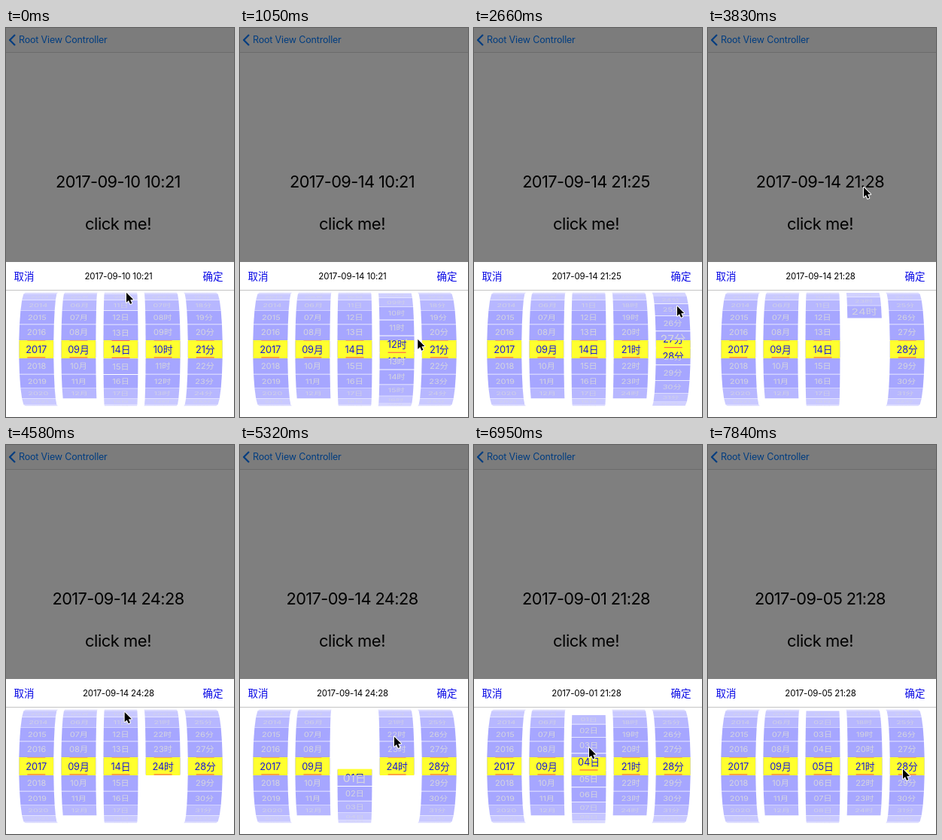
Animation of 303x517 px, one loop 7.99 s. Source, as an HTML page with a canvas:

```html
<!DOCTYPE html>
<html lang="zh">
<head>
<meta charset="utf-8">
<title>Date picker</title>
<style>
html, body { margin: 0; width: 100%; height: 100%; overflow: hidden; background: #fff; }
canvas { display: block; width: 303px; height: 517px; }
</style>
</head>
<body>
<canvas id="stage"></canvas>
<script>
const W = 303, H = 517, LOOP = 7990, STEP = 148;
const FONT = 'Inter, "Noto Sans CJK SC", "Noto Sans CJK", sans-serif';
const canvas = document.getElementById('stage');
const ctx = canvas.getContext('2d');
const dpr = window.devicePixelRatio || 1;
canvas.width = W * dpr;
canvas.height = H * dpr;

// Wheel geometry: a 22-sided drum seen in perspective
const CX = 152.5, CY = 427, RADIUS = 79.5, DEPTH = 1200;
const ANGLE = Math.PI * 2 / 22;
const HALF_W = 23, HALF_H = RADIUS * Math.tan(ANGLE / 2);
const ROW = 23, BAND_TOP = 415, BAND_H = 24;

const clamp = (v, lo, hi) => Math.max(lo, Math.min(hi, v));
const lerp = (a, b, u) => a + (b - a) * u;
const smooth = u => u * u * (3 - 2 * u);
const glide = u => 1 - (1 - u) ** 2;
const pad = n => String(n).padStart(2, '0');

const year = { unit: '', min: 1990, max: 2050, initial: 2017 };
const month = { unit: '月', min: 1, max: 12, initial: 9 };
const day = { unit: '日', min: 1, max: 30, initial: 10 };
const hour = { unit: '时', min: 1, max: 24, initial: 10 };
const minute = { unit: '分', min: 0, max: 59, initial: 21 };
const columns = [year, month, day, hour, minute];

// Scroll gestures in order of start; values beyond a limit bounce back
const scrolls = [
  { col: day, start: -1500, end: 100, to: 14, ease: glide },
  { col: hour, start: 890, end: 2215, to: 21, ease: glide },
  { col: minute, start: 1200, end: 2000, to: 25, ease: glide },
  { col: minute, start: 2370, end: 2840, to: 28, ease: glide },
  { col: hour, start: 3400, end: 3980, to: 26.7, ease: glide },
  { col: hour, start: 3980, end: 4430, to: 24, ease: smooth },
  { col: day, start: 4730, end: 5180, to: 0.05, ease: glide },
  { col: day, start: 5180, end: 5600, to: 1, ease: smooth },
  { col: hour, start: 5330, end: 5800, to: 21, ease: smooth },
  { col: day, start: 6500, end: 7300, to: 5, ease: glide }
];

// Cursor stops: ms, x, y
const stops = [[0, 160, 351], [750, 208, 455], [900, 210, 385], [1200, 271, 450],
  [1924, 274, 346], [2370, 270, 430], [2664, 270, 369], [3400, 208, 425],
  [3848, 207, 211], [4730, 154, 365], [5030, 152, 440], [5328, 205, 387],
  [5800, 206, 455], [6216, 182, 469], [6500, 152, 470], [7000, 153, 400],
  [7840, 259, 430]];

function positionAt(col, t) {
  return scrolls.filter(s => s.col === col && s.start < t).reduce(
    (pos, s) => lerp(pos, s.to, s.ease(clamp((t - s.start) / (s.end - s.start), 0, 1))),
    col.initial);
}

// The date shows the last moment at which every wheel was at rest
function dateAt(t) {
  const rest = scrolls.reduceRight((r, s) => s.start < r && r <= s.end ? s.start : r, t);
  const [y, mo, d, h, mi] = columns.map(col => pad(positionAt(col, rest)));
  return `${y}-${mo}-${d} ${h}:${mi}`;
}

function cursorAt(t) {
  const i = stops.findIndex(s => s[0] > t);
  if (i < 0) return stops[stops.length - 1].slice(1);
  const a = stops[i - 1], b = stops[i];
  const u = smooth((t - a[0]) / (b[0] - a[0]));
  return [lerp(a[1], b[1], u), lerp(a[2], b[2], u)];
}

function rect(x, y, w, h, color) {
  ctx.fillStyle = color;
  ctx.fillRect(x, y, w, h);
}

function text(str, x, y, size, color, align = 'center', spacing = 0) {
  ctx.font = `${size}px ${FONT}`;
  ctx.letterSpacing = spacing + 'px';
  ctx.textAlign = align;
  ctx.fillStyle = color;
  ctx.fillText(str, x, y);
}

function path(points) {
  ctx.beginPath();
  points.forEach(p => ctx.lineTo(p[0], p[1]));
}

// Projects a point at offset v from the middle of the face turned by angle a
function project(x, a, v) {
  const scale = DEPTH / (DEPTH + RADIUS * (1 - Math.cos(a)) + v * Math.sin(a));
  const y = RADIUS * Math.sin(a) + v * Math.cos(a);
  return [CX + (x - CX) * scale, CY + y * scale, scale];
}

function drawFace(label, x, offset, isCurrent) {
  const a = offset * ANGLE;
  if (Math.abs(a) > 1.54) return;
  const h = HALF_H - 0.5;
  ctx.globalAlpha = clamp(1 - (Math.abs(offset) - 2) * 0.2, 0.35, 1);
  path([project(x - HALF_W, a, -h), project(x + HALF_W, a, -h),
    project(x + HALF_W, a, h), project(x - HALF_W, a, h)]);
  ctx.fillStyle = '#a6a6ff';
  ctx.fill();

  const mid = project(x, a, 0), up = project(x, a, -1), down = project(x, a, 1);
  const size = isCurrent ? 15.5 : 11.2;
  ctx.save();
  ctx.transform(mid[2], 0, (down[0] - up[0]) / 2, (down[1] - up[1]) / 2, mid[0], mid[1]);
  text(label, 0, size * 0.36, size, '#d6d6de');
  ctx.restore();
  ctx.globalAlpha = 1;
}

function drawColumn(col, i, t) {
  const x = CX + (i - 2) * 56.1;
  const pos = positionAt(col, t);
  const current = clamp(Math.round(pos - 0.1), col.min, col.max);
  const rows = [];
  for (let n = Math.ceil(pos - 5.5); n <= pos + 5.5; n++) {
    if (n >= col.min && n <= col.max) rows.push({ n, y: CY + (n - pos) * ROW, label: pad(n) + col.unit });
  }
  rows.forEach(r => drawFace(r.label, x, r.n - pos, r.n === current));

  // Flat list seen through the selection band
  ctx.save();
  ctx.beginPath();
  ctx.rect(x - HALF_W, BAND_TOP, HALF_W * 2, BAND_H);
  ctx.clip();
  rows.forEach(r => rect(x - HALF_W, r.y - BAND_H / 2, HALF_W * 2, BAND_H, '#ffff2e'));
  rows.forEach(r => {
    text(r.label, x, r.y + 4.8, 12.8, '#1c1cd6', 'center', -0.1);
    rect(x - 12, r.y + 10.4, 24, 1.1, '#ff5a4a');
  });
  ctx.restore();
}

function drawPage(date) {
  rect(0, 0, W, 311, '#7f7f7f');
  rect(0, 0, W, 32, '#7c7c7c');
  rect(0, 32, W, 1, '#6b6b6b');
  path([[12, 9], [5, 16], [12, 23]]);
  ctx.strokeStyle = '#003d80';
  ctx.lineWidth = 2.2;
  ctx.stroke();
  text('Root View Controller', 17, 20.3, 12.5, '#003d80', 'left', -0.17);
  text(date, 149, 211.7, 21.8, '#000', 'center', -0.6);
  text('click me!', 149, 268, 22, '#000', 'center', -0.5);
}

function drawSheet(date) {
  rect(0, 311, W, H - 311, '#fff');
  rect(0, 348, W, 1, '#c4c4c4');
  text('取消', 10.5, 334.8, 13.5, '#0a0ae6', 'left');
  text('确定', 288.4, 334.8, 13.5, '#0a0ae6', 'right');
  text(date, 149.5, 334, 11.5, '#000', 'center', -0.15);
}

function drawCursor([x, y]) {
  path([[0, 0], [0, 13], [3, 10.3], [5.1, 15], [7.3, 14], [5.2, 9.4], [9.2, 9.2]]
    .map(p => [x + p[0], y + p[1] + 0.8]));
  ctx.closePath();
  ctx.lineJoin = 'round';
  ctx.lineWidth = 2;
  ctx.strokeStyle = '#fff';
  ctx.stroke();
  ctx.fillStyle = '#000';
  ctx.fill();
}

function draw(now) {
  // The picture advances in held steps
  const t = Math.floor((now % LOOP + 25) / STEP) * STEP;
  const date = dateAt(t);
  ctx.setTransform(dpr, 0, 0, dpr, 0, 0);
  drawPage(date);
  drawSheet(date);
  columns.forEach((col, i) => drawColumn(col, i, t));
  drawCursor(cursorAt(t));
}

const start = performance.now();
function tick() {
  draw(performance.now() - start);
  requestAnimationFrame(tick);
}
tick();
</script>
</body>
</html>
```
